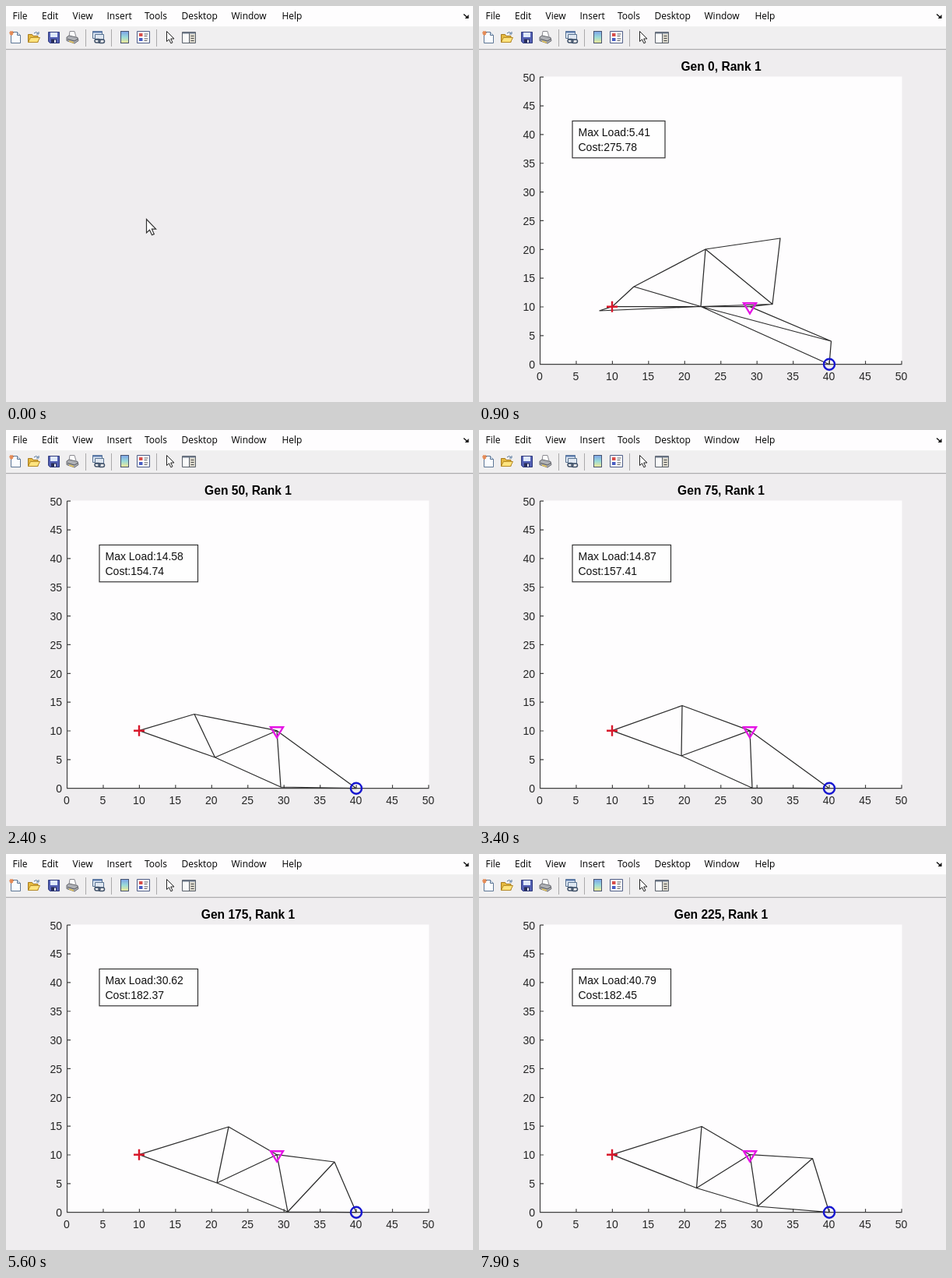
These frames come from a looping animation (600 by 508 pixels, 8 s). An HTML page:

```html
<!DOCTYPE html>
<html lang="en">
<head>
<meta charset="utf-8">
<title>Truss evolution</title>
<style>
  html, body { margin: 0; width: 100%; height: 100%; overflow: hidden; background: #efedef; }
  svg { display: block; width: 600px; height: 508px; }
  .menu { font: 12px "Open Sans", "Noto Sans", sans-serif; fill: #000; }
  .label { font: 14px "Liberation Sans", Arial, sans-serif; fill: #262626; }
  .title { font: bold 15.6px "Liberation Sans", Arial, sans-serif; fill: #000; text-anchor: middle; }
  .axis { stroke: #404040; stroke-width: 1.2; fill: none; }
  .note { fill: #fefefe; stroke: #333; stroke-width: 1.2; }
  .note-text { fill: #111; }
  .truss { stroke: #2c2c2c; stroke-width: 1.25; fill: none; stroke-linejoin: round; }
  .mark { stroke-width: 2.4; fill: none; }
</style>
</head>
<body>
<svg id="stage" viewBox="0 0 600 508">
  <rect width="600" height="508" fill="#efedef"/>
  <rect width="600" height="26.5" fill="#fefdfe"/>
  <rect y="26.5" width="600" height="28.5" fill="#f0eff0"/>
  <rect y="55" width="600" height="1.2" fill="#acabad"/>
  <g id="menu" class="menu"></g>
  <path d="M588 10.5l4 3.5" stroke="#111" stroke-width="1.4"/>
  <path d="M594.5 11v5h-5z" fill="#111"/>

  <g id="separators" stroke="#aaa9ab"></g>
  <!-- new -->
  <g transform="translate(4 32)">
    <path d="M2.5 1.5h8l4 4v10h-12z" fill="#fafcff" stroke="#5d7695"/>
    <path d="M10.5 1.5v4h4" fill="#d3e0ee" stroke="#5d7695"/>
    <path d="M0 2.5h6M3 0v6M1 .5l4 4M5 .5l-4 4" stroke="#e58a55" stroke-width="1.2"/>
  </g>
  <!-- open -->
  <g transform="translate(28 32)">
    <path d="M.5 14.5v-10h5l1.5 2h6v8z" fill="#e5b93f" stroke="#a67a1e"/>
    <path d="M.5 14.5l3-6h12l-3 6z" fill="#ffe47e" stroke="#b58a25"/>
    <path d="M8 3q3-3 5 0M14 1v3h-3" fill="none" stroke="#50749c"/>
  </g>
  <!-- save -->
  <g transform="translate(53 32)">
    <path d="M1.5 1.5h14v14h-12l-2-2z" fill="#5360b4" stroke="#303b7d"/>
    <path d="M4 2h9v6H4z" fill="#dfe9fb"/>
    <path d="M5 10.5h7V15H5z" fill="#272d58"/>
    <path d="M9 11.5h2V15H9z" fill="#e9ecf6"/>
  </g>
  <!-- print -->
  <g transform="translate(77 32)">
    <path d="M4 7l1-6.5h6l2 7" fill="#fff" stroke="#8a8a90"/>
    <path d="M1 8l3-2 11 2.5 1 4-5 3.5-10-3.5z" fill="#aeb0b5" stroke="#66686e"/>
    <path d="M2 10.5l9 2.5 4-2.5" fill="none" stroke="#55575c"/>
    <path d="M4 13l6 2" stroke="#e3c35a" stroke-width="1.5"/>
  </g>
  <!-- link -->
  <g transform="translate(110 32)">
    <path d="M1.5 .5h12v9h-12z" fill="#dfe9f5" stroke="#56708f"/>
    <path d="M1.5 1.5h12" stroke="#5d7cae" stroke-width="2"/>
    <path d="M4.5 4.5h11v7h-11z" fill="#dfe7f1" stroke="#56708f"/>
    <rect x="4" y="10.5" width="7" height="4.5" rx="2.2" fill="none" stroke="#43546b" stroke-width="1.5"/>
    <rect x="9" y="11" width="7.5" height="4.5" rx="2.2" fill="none" stroke="#43546b" stroke-width="1.5"/>
  </g>
  <!-- colorbar -->
  <linearGradient id="bar" x2="0" y2="1">
    <stop stop-color="#7da2e8"/><stop offset=".5" stop-color="#9adbd9"/><stop offset="1" stop-color="#f3ea94"/>
  </linearGradient>
  <rect x="147.5" y="32.5" width="10" height="15" fill="url(#bar)" stroke="#46536f"/>
  <!-- legend -->
  <g transform="translate(168 32)">
    <path d="M.5 .5h16v15H.5z" fill="#fff" stroke="#4d5c86"/>
    <path d="M3 3h4.5v4H3z" fill="#d84d49"/>
    <path d="M3 9h4.5v4H3z" fill="#4a5fc4"/>
    <path d="M9.5 4h5M9.5 6.5h4M9.5 10h5M9.5 12.5h4" stroke="#55555c"/>
  </g>
  <!-- pointer -->
  <path d="M206.5 32.5v13l3-2.7 2.3 5 2.2-1-2.3-4.8h4.3z" fill="#fff" stroke="#222"/>
  <!-- inspector -->
  <g transform="translate(226 32)">
    <path d="M.5 1.5h17v14H.5z" fill="#fafafa" stroke="#59606a"/>
    <path d="M1 2.5h16" stroke="#6a7687" stroke-width="2"/>
    <path d="M9.5 3v12" stroke="#59606a"/>
    <path d="M10 4h7v11h-7z" fill="#dad7cb"/>
    <path d="M11.5 6.5h4M11.5 9.5h4M11.5 12.5h4" stroke="#4c4c4c"/>
  </g>

  <g id="plot">
    <rect x="78.5" y="90.5" width="465" height="369" fill="#fefdfe"/>
    <g id="axes"></g>
    <text id="title" class="title" x="311" y="83"></text>
    <rect id="note" class="note" x="120" y="147.5" height="47.3"/>
    <text id="load" class="label note-text" x="127.5" y="167"></text>
    <text id="cost" class="label note-text" x="127.5" y="185.5"></text>
    <path id="truss" class="truss"/>
    <path class="mark" stroke="#d8182b" d="M164 385.7h14M171 378.7v14"/>
    <path class="mark" stroke="#e514e5" d="M340 381.3h16l-8 13.2z"/>
    <circle class="mark" stroke="#1616d0" cx="450" cy="459.7" r="7"/>
  </g>
  <path id="cursor" d="M180.5 273.5v17.5l4-3.7 3 6.5 2.8-1.2-2.9-6.4h5.2z" fill="#fff" stroke="#333" stroke-width="1.2"/>
</svg>
<script>
const LOOP = 8000;
const $ = id => document.getElementById(id);

function add(parent, tag, attrs, text = "") {
  const el = document.createElementNS("http://www.w3.org/2000/svg", tag);
  for (const key in attrs) el.setAttribute(key, attrs[key]);
  el.textContent = text;
  parent.append(el);
}

Object.entries({ File: 8.5, Edit: 46, View: 85.5, Insert: 129.5, Tools: 178, Desktop: 225.5, Window: 289.5, Help: 354.5 })
  .forEach(([name, x]) => add($("menu"), "text", { x, y: 17 }, name));
for (const x of [102.5, 135.5, 193.5]) add($("separators"), "path", { d: `M${x} 30v22` });

const LEFT = 78.5, BASE = 459.7;
let ticks = `M${LEFT} 91V${BASE}H543.5`;
for (let v = 0; v <= 50; v += 5) {
  const x = LEFT + v * 9.29, y = BASE - v * 7.37;
  ticks += `M${x} ${BASE}v-4.5M${LEFT} ${y}h4.5`;
  add($("axes"), "text", { class: "label", x: x - 0.5, y: 480, "text-anchor": "middle" }, v);
  add($("axes"), "text", { class: "label", x: 72, y: y + 5.3, "text-anchor": "end" }, v);
}
add($("axes"), "path", { class: "axis", d: ticks });

const PIN = "171 385.7", LOAD = "348 385.7", END = "450 459.7";

const first = `M154.5 391L${PIN} 199 360 291 312 387 298 377 382.5 291 312 285 385.5 199 360
  M${PIN}L285 385.5 ${LOAD} 377 382.5 285 385.5 154.5 391
  M${LOAD}L452.5 430 ${END} 285 385.5 452.5 430`;

// Upper joint, lower joint, base joint and an optional brace joint.
function truss(top, low, base, brace) {
  const right = brace
    ? `M${LOAD}L${brace} ${END} ${base} ${brace}`
    : `M${LOAD}L${END} ${base}`;
  return `M${PIN}L${top} ${LOAD} ${low} ${PIN}M${top}L${low} ${base} ${LOAD}${right}`;
}

// start time, generation, max load, cost, shape
const steps = [
  [100, 0, "5.41", "275.78", first],
  [1200, 25, "12.96", "158.32", truss("237 362", "272 418", "355 457")],
  [2000, 50, "14.58", "154.74", truss("242 364.5", "268.5 420", "353 458")],
  [2900, 75, "14.87", "157.41", truss("261 353.5", "260 418", "351 459.2")],
  [3700, 100, "14.69", "155.02", truss("267 364", "279 426", "358 459")],
  [4400, 125, "14.71", "154.13", truss("271 369.5", "289 431", "363 458.5")],
  [5000, 150, "14.75", "154.11", truss("272 369", "288 430.5", "363 459")],
  [5600, 175, "30.62", "182.37", truss("286 350", "271 422", "362 459", "422 395")],
  [6200, 200, "33.77", "182.44", truss("289 349", "268.5 421.5", "361.5 459", "423 394")],
  [7200, 225, "40.79", "182.45", truss("286 349.5", "279.5 428.5", "358 452", "428.5 390.5")]
];

let shown;
function draw(now) {
  const time = now % LOOP;
  const step = steps.filter(s => s[0] <= time).pop() || null;
  if (step === shown) return;
  shown = step;
  $("plot").style.display = step ? "" : "none";
  $("cursor").style.display = step ? "none" : "";
  if (!step) return;
  const [, gen, load, cost, shape] = step;
  $("title").textContent = `Gen ${gen}, Rank 1`;
  $("load").textContent = `Max Load:${load}`;
  $("cost").textContent = `Cost:${cost}`;
  $("note").setAttribute("width", load.length > 4 ? 126.5 : 119);
  $("truss").setAttribute("d", shape);
}

const origin = performance.now();
function tick() {
  draw(performance.now() - origin);
  requestAnimationFrame(tick);
}
tick();
</script>
</body>
</html>
```
